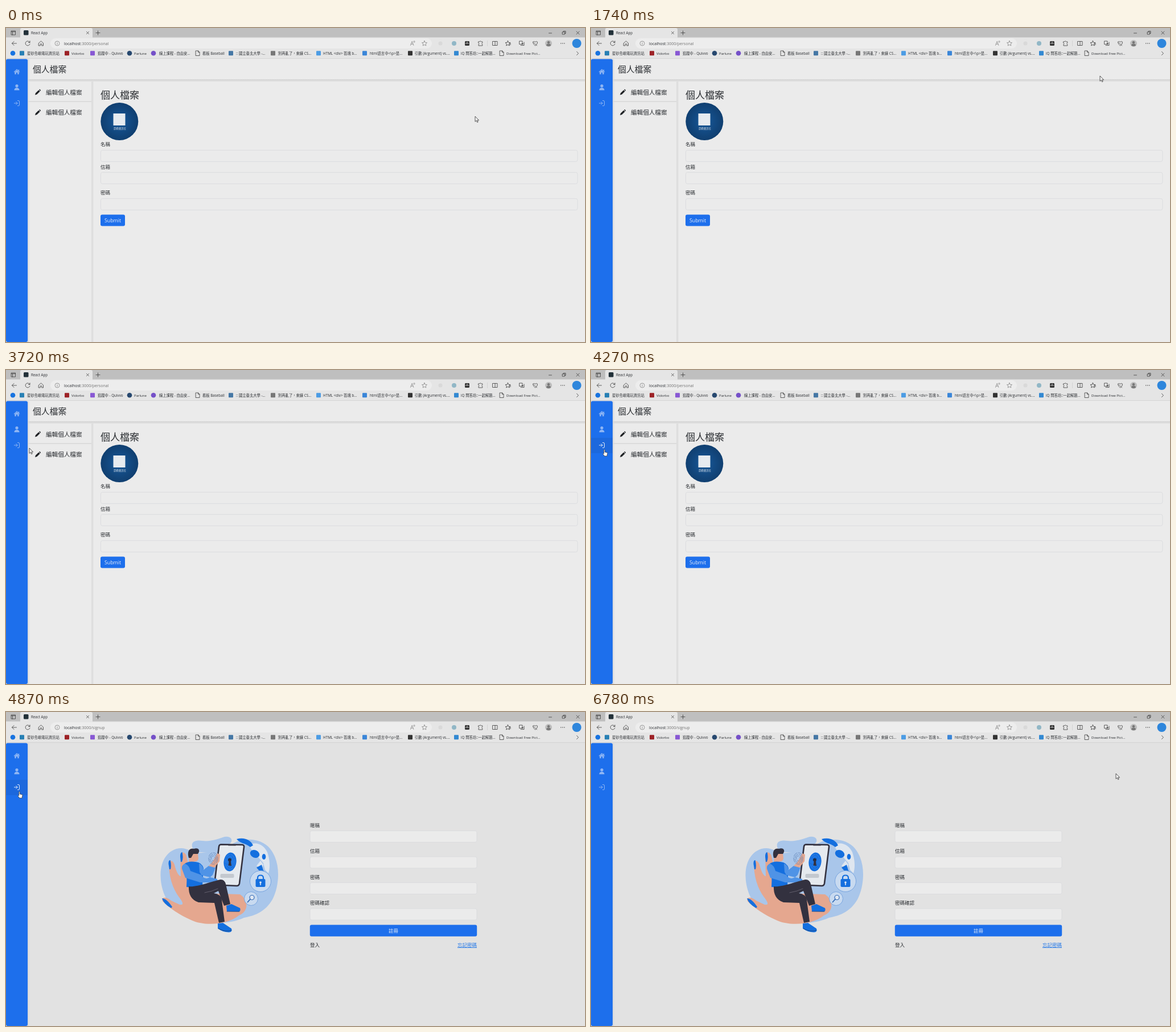
Recreate the animation shown at these times as an HTML page. Size 1017 px wide and 551 px high, loop 7.11 s.

```html
<!DOCTYPE html>
<html lang="zh-Hant">
<head>
<meta charset="utf-8">
<title>React App</title>
<style>
  html, body { margin: 0; width: 100%; height: 100%; overflow: hidden; background: #e2e2e2; }
  svg { display: block; width: 100vw; height: 100vh; }
  text { font-family: "Open Sans", "Noto Sans CJK TC", "Noto Sans CJK JP", "Noto Sans CJK", sans-serif; fill: #2a2d31; white-space: pre; }
  .line { fill: none; stroke: #3c3c3c; stroke-width: .8; stroke-linecap: round; stroke-linejoin: round; }
  .faint { stroke: #777; stroke-width: .7; }
  .field { fill: #ebebeb; stroke: #d8dadc; stroke-width: .8; }
  .art { fill: #146fdf; }
  .sleeve { fill: #4f93e6; }
  .white { fill: #dfe6ef; }
  .pale { fill: #a9c6ea; }
  .skin { fill: #e5a78f; }
  .dark { fill: #33313f; }
  #nav path { fill: #8fb6f4; }
  #nav .line { fill: none; stroke: #8fb6f4; stroke-width: 1; }
  #nav.hover #enter { stroke: #e3ebf7; }
</style>
</head>
<body>
<svg viewBox="0 0 1017 551" preserveAspectRatio="none">
  <defs>
    <linearGradient id="fade" x2="0" y2="1"><stop stop-color="#d3d3d3"/><stop offset="1" stop-color="#e2e2e2"/></linearGradient>
    <linearGradient id="side"><stop stop-color="#cbcfd6"/><stop offset="1" stop-color="#e2e2e2" stop-opacity="0"/></linearGradient>
    <radialGradient id="photo"><stop stop-color="#17589a"/><stop offset="1" stop-color="#103f70"/></radialGradient>
  </defs>
  <rect width="1017" height="551" fill="#e2e2e2"/>
  <g id="browser"></g>
  <g id="personal"></g>
  <g id="signup"></g>
  <g id="nav">
    <rect x="38" y="55" width="4" height="496" fill="url(#side)"/>
    <rect y="54.500" width="38" height="496.500" rx="3" fill="#1d6fec"/>
    <rect id="glow" y="119" width="38" height="27" fill="#1c68dd"/>
    <path d="M13.600 77L19 72l2.800 2.600V73h1.300v2.800l1.300 1.200-.7.8-4.700-4.300-4.700 4.300zM15.300 77.300L19 74l3.700 3.300v4h-2.500v-3h-2.400v3h-2.500z"/>
    <path d="M19 99a2.600 2.600 0 1 1 0 5.200a2.600 2.600 0 1 1 0-5.200zM14.400 109.300c0-6 9.200-6 9.200 0z"/>
    <path id="enter" class="line" d="M14.500 132h5.500m-2.200-2.400l2.400 2.400-2.400 2.400M20.500 127.500h1.600q1.400 0 1.400 1.400v6.200q0 1.400-1.400 1.400h-1.600"/>
  </g>
  <path id="arrow" d="M0 0V9.300L2.200 7.400L3.700 10.600L5.200 9.900L3.700 6.900H6.600Z" fill="#f4f4f4" stroke="#333" stroke-width=".8"/>
  <path id="hand" d="M1.700 7V1.200Q2.600 0 3.400 1.200V5L7.300 5.900Q8 6.200 7.900 7.500L7.100 12H2.700L0 8.400Q0 7 1.700 7.600Z" fill="#f6f6f6" stroke="#333" stroke-width=".7"/>
</svg>
<script>
const $ = id => document.getElementById(id);
const text = (x, y, size, value, extra = '') =>
  `<text x="${x}" y="${y}" font-size="${size}" ${extra}>${value.replace(/</g, '&lt;')}</text>`;
const rect = (x, y, w, h, fill, r = 0, extra = '') =>
  `<rect x="${x}" y="${y}" width="${w}" height="${h}" fill="${fill}" rx="${r}" ${extra}/>`;
const dot = (x, y, r, fill, extra = '') => `<circle cx="${x}" cy="${y}" r="${r}" fill="${fill}" ${extra}/>`;
const line = (d, extra = '') => `<path class="line" d="${d}" ${extra}/>`;
const faint = d => `<path class="line faint" d="${d}"/>`;
const shape = (cls, d) => `<path class="${cls}" d="${d}"/>`;
const oval = (cls, x, y, rx, ry, turn = 0) =>
  `<ellipse class="${cls}" cx="${x}" cy="${y}" rx="${rx}" ry="${ry}" transform="rotate(${turn} ${x} ${y})"/>`;
const field = (x, y, w) => rect(x, y, w, 20, '', 3, 'class="field"');
const star = (x, y) => `M${x} ${y - 4.5}l1.300 2.900 3.200.4-2.400 2.100.7 3.100-2.800-1.600-2.800 1.600.7-3.100-2.400-2.100 3.200-.4z`;
const sheet = x => line(`M${x - 3} 40h4l2.500 2.500v6h-6.500zM${x + 1} 40v2.500h2.500`);

const bookmarks = [
  // icon centre, icon colour, round?, text x, label
  [12, '#1873e0', 1, 0, ''],
  [28, '#2880b4', 0, 37, '星砂島嶼電玩資訊站'],
  [107, '#9d2226', 0, 115, 'Vidorbo'],
  [152, '#8858d4', 0, 161, '追蹤中 - Quivvo'],
  [217, '#27486f', 1, 225, 'Parlune'],
  [259, '#7550c8', 1, 269, '線上課程 - 自由安...'],
  [336.5, '', 0, 345, '看板 Baseball'],
  [395, '#4577a5', 0, 404, ':: 國立臺北大學 -...'],
  [469, '#777', 0, 478, '別再亂了，來練 CS...'],
  [549, '#4c9ce4', 0, 557, 'HTML <div> 區塊 b...'],
  [630, '#3b86d8', 0, 639, 'html語言中<\\p>是...'],
  [710, '#333', 0, 718, '引數 (Argument) vs....'],
  [791, '#3389d2', 0, 799, 'iQ 問答坊::一起解題...'],
  [870.5, '', 0, 879, 'Download Free Pict...']
];

function browser() {
  let s = rect(0, 0, 1017, 17, '#bfbfbf') + rect(0, 16.5, 1017, 37.5, '#e5e5e5') +
    rect(25, 0, 127, 20, '#e5e5e5', 3) + rect(0, 53.3, 1017, .8, '#cecece') +
    rect(78, 18, 670, 18, '#ededed', 9) + rect(31, 4, 8.5, 8.5, '#223139', 1.5) +
    text(44, 10.8, 6.2, 'React App') +
    `<text x="102" y="29.500" font-size="7">localhost<tspan fill="#727272">:3000/<tspan id="route"></tspan></tspan></text>`;
  s += line('M9.500 5h7v7h-7zM9.500 6.500h7M11.500 6.500v5.500M141.500 6.500l4 4m0-4l-4 4M158 8.500h7M161.500 5v7M953.500 9h5M977.500 7h4v4h-4zM979 6.800v-1.300h4v4h-1.300M1002 6l5 5m0-5l-5 5');
  s += line('M18.500 27h-8m3.500-3.500L10.500 27l3.500 3.500M41.800 25.300a4 4 0 1 0 .2 2.700M42 22.800v2.700h-2.700M57.500 26.500l4-3.500 4 3.500v4.500h-2.700v-3h-2.600v3h-2.700z');
  s += dot(90, 27, 4, 'none', 'stroke="#777" stroke-width=".7"') + faint('M90 26.500v2.500M90 25v.1') +
    faint('M710.500 30.500l2.700-7 2.700 7m-4.500-2.300h3.600M716 23q1 1 0 2M717.500 22.500q1.500 1.500 0 3' + star(735, 27));
  s += dot(763, 27, 3.5, '#d9d9d9') + dot(787, 27, 4, '#91b7c6') + rect(806, 23, 8, 8, '#333', 1.5) +
    line('M807 27h6M810 24v3', 'style="stroke:#ddd"') +
    line('M830 24h2q1-2.500 2.500 0h2.300v2.300q-2.500 1.200 0 2.600V31H830v-2q2-1.700 0-2.800z');
  s += line('M855 23.500h8v7h-8zM859 23.500v7M902 23h5v5.500h-5zM904 30.500h6v-5.500M906 27.700h2.500M907.200 26.500v2.500M925.500 24.500q2-2 4 0q2-2 4 0q.5 4-4 6.500q-4-2.500-4-6.500M927.500 26l5 5M884 27h2.500M884.500 29h2' + star(881.5, 27)) +
    rect(845.3, 22, .6, 10, '#c4c4c4');
  s += dot(953, 27, 6, '#bdbdbd') + dot(953, 25.2, 2.2, '#777') + `<path d="M949 30.500c0-4 8-4 8 0q-4 3-8 0" fill="#777"/>` +
    [974.8, 977.8, 980.8].map(x => dot(x, 27, .7, '#333')).join('') + dot(1002.5, 27, 8, '#2e86dc');
  for (const [x, color, round, tx, label] of bookmarks) {
    s += !color ? sheet(x) : round ? dot(x, 44.3, 4.3, color) : rect(x - 4, 40.3, 8, 8, color, 1);
    s += text(tx, 46.7, /[^\x00-\x7f]/.test(label) ? 6.3 : 6.1, label);
  }
  return s + line('M1002.500 41.500l3 3-3 3');
}

function personal() {
  const pencil = y => `<path transform="translate(51 ${y})" d="M0 10l.9-3.200L6.300 1.400l2.400 2.400L3.300 9.100zM7 .8Q8 -.5 9.200.7Q10.800 2 9.500 3.200z" fill="#202326"/>`;
  let s = rect(38, 54, 979, 36, '#ebebeb') + rect(38, 90, 979, 4, 'url(#fade)') +
    rect(38, 94, 112, 457, '#ebebeb') + rect(150, 94, 3.5, 457, '#dedede') + rect(153.5, 94, 864, 457, '#ebebeb') +
    rect(38, 128.3, 112, 1.4, '#d6d6d6') +
    text(47, 77.8, 14.8, '個人檔案') + text(166, 124, 17, '個人檔案', 'font-weight="500"');
  for (const y of [112.5, 148]) s += pencil(y - 5) + text(70, y + 4, 10.6, '編輯個人檔案', 'font-weight="500"');
  s += dot(199.3, 164, 33, 'url(#photo)') + rect(188.5, 150, 21, 21, '#e6ebf0') +
    text(199.8, 177.5, 4.5, '澄嶼通訊社', 'text-anchor="middle" style="fill:#d5dfe9"');
  [['名稱', 204, 214], ['信箱', 243.5, 253], ['密碼', 289, 299]].forEach(([label, y, top]) =>
    s += text(166, y + 3.2, 8.5, label, 'font-weight="500"') + field(166.4, top + .4, 837.5));
  return s + rect(166, 327.5, 43, 20, '#1d6fec', 3) + text(173, 341.1, 8.8, 'Submit', 'style="fill:#e8eef8"');
}

function illustration() {
  const badge = (x, y, r) => dot(x, y, r, '#c8daf0', 'stroke="#78a5df" stroke-width="1"');
  const ridges = (x, y, rx, ry, color) => [1, .72, .44].map(k =>
    `<ellipse cx="${x}" cy="${y}" rx="${rx * k}" ry="${ry * k}" fill="none" stroke="${color}" stroke-width=".8" stroke-dasharray="9 1.500"/>`).join('');
  const backdrop =
    shape('pale', 'M271.500 287C271 257 288 239 308 239C323 240 330 249 345 247C370 245 388 239 400 230C420 219 451 223 464 240C484 265 480 306 468 329C456 349 440 357 418 361C380 379 304 372 285 333C276 320 271.500 302 271.500 287Z') +
    shape('pale', 'M328 239C323 227 334 224 345 226C360 228 374 222 384 219C397 217 400 227 392 232L376 248L340 246Q331 245 328 239Z');
  const palm =
    shape('skin', 'M286 264C288 259 294 261 296 268C299 280 303 288 307 288L306 252C307 244 315 245 317 253C321 272 327 294 332 306L348 318L411 320C426 330 427 350 409 357C389 374 347 376 325 365C305 356 288 345 275 332C272 324 282 324 290 331L305 338C313 339 311 334 304 325C292 309 286 288 286 264Z') +
    shape('art', 'M285.500 267Q285 260 288.500 260Q291 269 289 276H287ZM306 254Q306 246 309.500 246Q312 256 309 263H307ZM274 327Q282 327 292 342L290 344Q277 337 274 327Z');
  const robot =
    shape('white', 'M427 233C440 226 454 234 459 246C464 261 464 273 461 283L455 277L452 265L446 258L430 240Z') +
    shape('white', 'M440 270L447 261L452 268L449 275Z') +
    shape('art', 'M405 223C419 219 430 225 434 234L429 237C421 230 411 231 405 223ZM440 273L449 268L452 278L460 286L447 281Z') +
    oval('art', 437, 249, 8.5, 6.5, 25) + oval('art', 453, 254, 3.3, 5);
  const phone =
    `<path d="M378 232.500L415 233Q418.500 233.500 418 237L410 301Q409 305.300 405 305L369.500 303.500Q366 303 366.500 299L374 236Q374.500 232.500 378 232.500Z" fill="#e5e9ee" stroke="#33313f" stroke-width="2.600"/>` +
    shape('dark', 'M389 232h16l-1.500 2.600h-13z') +
    oval('art', 393.5, 263, 11, 16.5, 8) + ridges(393.5, 263, 8.5, 13, '#4088e4') +
    dot(393, 259.5, 3, '#202e4a') + shape('dark', 'M392 260h2.500l1.500 10-5.500-.7z') + rect(376.5, 284, 24, 7, '#c3c8cf', 2);
  const badges =
    badge(447, 297, 18.5) + rect(438.5, 293, 17, 14, '#146fdf', 2) +
    `<path d="M442 293v-2q0-4.500 5-4.500t5 4.500v2" fill="none" stroke="#146fdf" stroke-width="2.200"/>` +
    dot(447, 299, 1.8, '#dce7f5') + rect(446.2, 299, 1.6, 5, '#dce7f5') +
    badge(430.5, 327.5, 12) + dot(432, 325.5, 4, '#e0e8f3', 'stroke="#3269b5" stroke-width="1.200"') +
    line('M429 328.500l-4.500 5', 'style="stroke:#3269b5;stroke-width:1.800"');
  const person =
    shape('skin', 'M322 249Q331 245 337 248L338 257Q337 263 331 262L330 268L321 266Z') +
    shape('dark', 'M321 256C318 246 321 238 330 240C338 237 342 243 337 249L329 249L325 256Z') +
    shape('art', 'M313 267Q319 261 333 263Q344 264 347 274L345 304Q333 309 317 307Q319 285 313 267Z') +
    shape('sleeve', 'M314 266Q308 269 309 275L315 291L341 299L372 299L371 293L346 287L324 279Q322 269 314 266ZM339 266Q345 268 347 277L356 270L368 273L363 286Q353 296 345 289L340 281Z') +
    shape('skin', 'M356 270L362 264L371 248L376 250L375 262L366 273Z') +
    ridges(364, 257, 8, 10, '#5d82b7') +
    shape('dark', 'M321 306C334 308 362 297 377 294Q384 294 386 302L394 337L383 340L373 314L365 318Q377 319 379 330L384 368L374 370L366 335L338 334Q320 328 321 306Z') +
    line('M349 317Q362 315 372 310', 'style="stroke:#777382;stroke-width:.7"') +
    shape('art', 'M387 340L396 337L411 344Q413 349 409 350.500L388 350ZM372 371L381 370L396 380Q398 386 392 386.500Q382 387 372 380Z') +
    line('M388 350H410M373 380Q385 387 396 383', 'style="stroke:#203c65;stroke-width:.7"');
  return backdrop + palm + robot + phone + badges + person;
}

function signup(width) {
  const x = 534, right = x + width;
  let s = '';
  ['暱稱', '信箱', '密碼', '密碼確認'].forEach((label, i) => {
    const y = 198.3 + i * 45.5;
    s += text(x, y + 3.2, 8.5, label, 'font-weight="500"') + field(x, y + 10.2, width);
  });
  return s + rect(x - .2, 373.6, width + .4, 20.2, '#1d6fec', 3) +
    text(x + width / 2, 387, 8.5, '註冊', 'text-anchor="middle" style="fill:#e8eef8"') +
    text(x, 412, 8.5, '登入', 'font-weight="500"') +
    text(right, 412, 8.5, '忘記密碼', 'text-anchor="end" text-decoration="underline" style="fill:#2277e8"');
}

$('browser').innerHTML = browser();
$('personal').innerHTML = personal();
const compactForm = signup(64), fullForm = signup(293) + illustration();

const LOOP = 7110, PAGE_AT = 4470, LOADED_AT = 4870;
const ticks = [0, 810, 910, 1010, 1110, 1210, 1410, 1540, 1740, 1940, 2140, 2400, 2660, 2990, 3320,
  3720, 3800, 3870, 3950, 4030, 4110, 4180, 4260, 4340, 5530, 5660, 5860, 6060, 6320, 6520, 6780];
const path = [[0, 824, 155], [810, 824, 155], [1740, 894, 84], [2990, 170, 126], [3320, 166, 142],
  [3720, 41, 137], [4110, 21, 139], [5400, 21, 139], [6520, 922, 108], [LOOP, 922, 108]];

function pointer(time) {
  const t = ticks.findLast(tick => tick <= time);
  const i = path.findIndex(key => key[0] > t);
  const [t0, x0, y0] = path[i - 1], [t1, x1, y1] = path[i];
  const k = (t - t0) / (t1 - t0);
  return [x0 + (x1 - x0) * k, y0 + (y1 - y0) * k];
}

const show = (id, visible) => $(id).style.display = visible ? '' : 'none';
let shownForm;

function draw() {
  const t = performance.now() % LOOP;
  const [x, y] = pointer(t), overNav = x < 36;
  const onSignup = t >= PAGE_AT, form = t < LOADED_AT ? compactForm : fullForm;
  show('personal', !onSignup);
  show('signup', onSignup);
  $('route').textContent = onSignup ? 'signup' : 'personal';
  if (form !== shownForm) $('signup').innerHTML = shownForm = form;
  show('glow', overNav);
  $('nav').classList.toggle('hover', overNav);
  show('arrow', !overNav);
  show('hand', overNav);
  $(overNav ? 'hand' : 'arrow').setAttribute('transform', `translate(${x} ${y})`);
  requestAnimationFrame(draw);
}
draw();
</script>
</body>
</html>
```
